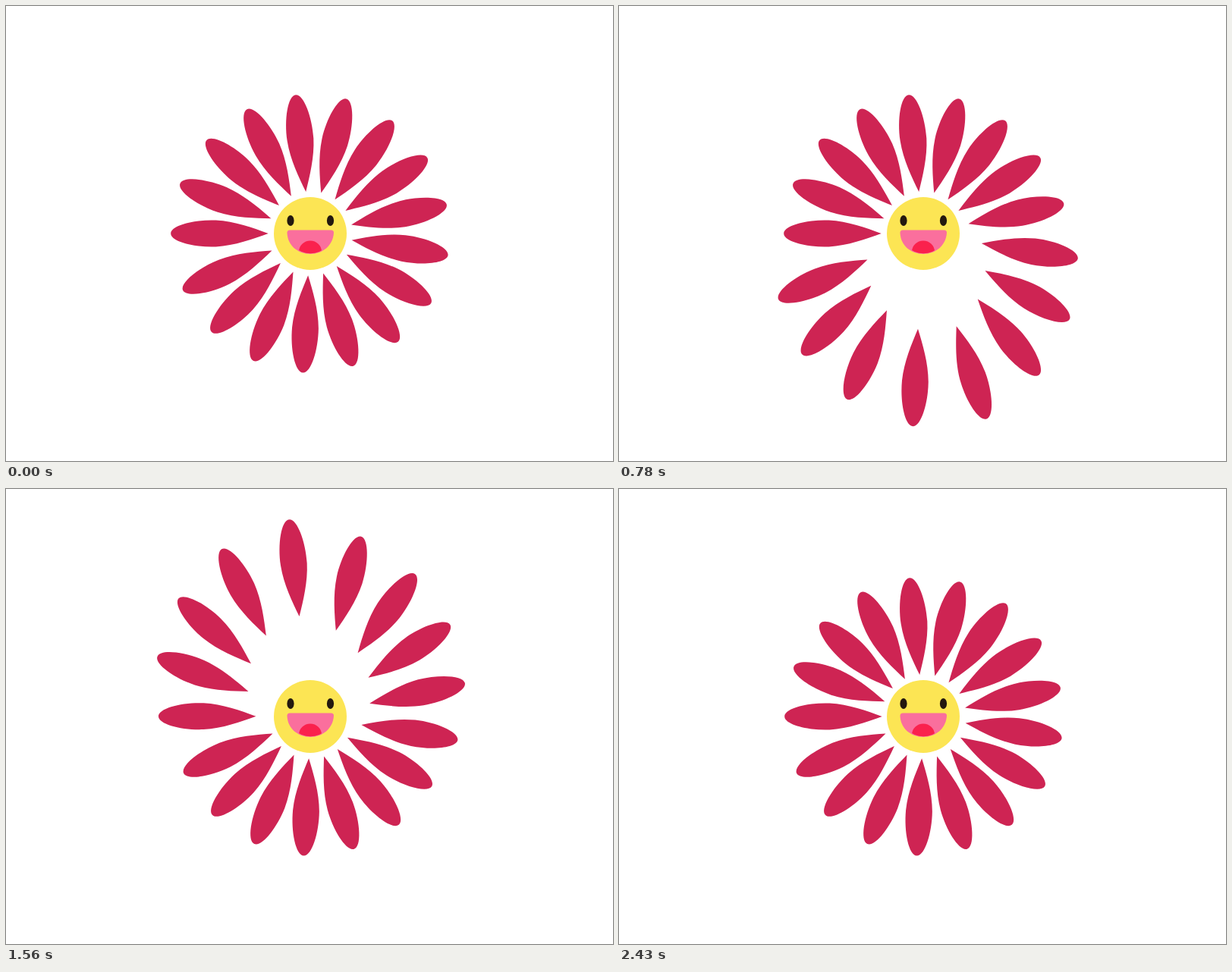
These frames come from a looping animation (800x600 px, 2460 ms). An HTML page:

```html
<!DOCTYPE html>
<html lang="en">
<head>
<meta charset="utf-8">
<title>Flower</title>
<style>
  html, body { margin: 0; width: 100%; height: 100%; overflow: hidden; background: #fff; }
  svg { display: block; width: 100%; height: 100%; }
</style>
</head>
<body>
<svg viewBox="0 0 800 600">
  <defs>
    <path id="petal" d="M0 0C20 -7.2 44 -16 69 -17.4C98 -18.6 128.5 -10.5 128.5 0C128.5 10.5 98 18.6 69 17.4C44 16 20 7.2 0 0Z"/>
    <clipPath id="lips"><path d="M371 296H431.500A30.250 30.250 0 0 1 371 296Z"/></clipPath>
  </defs>
  <g id="petals" fill="#ce2453"></g>
  <circle cx="401" cy="300" r="48" fill="#fce554"/>
  <path d="M374 295.500H428.500Q432 295.500 432 299C431 316 417 327 401 327S371 316 370.500 299Q370.500 295.500 374 295.500Z" fill="#fa6f9d"/>
  <g clip-path="url(#lips)">
    <ellipse class="pulse" data-at="401 324" rx="15" ry="14.500" fill="#fa214d"/>
  </g>
  <g fill="#23180f">
    <ellipse class="pulse" data-at="375 283" rx="4.600" ry="7"/>
    <ellipse class="pulse" data-at="427.500 283" rx="4.600" ry="7"/>
  </g>
</svg>
<script>
const LOOP = 2460, STEP = 30, COUNT = 17, RADIUS = 55.3, REACH = 80;

const rad = deg => deg * Math.PI / 180;
const progress = (t, from, to) => Math.min(1, Math.max(0, (t - from) / (to - from)));

const layer = document.getElementById('petals');
const petals = Array.from({ length: COUNT }, (_, i) => {
  const el = document.createElementNS('http://www.w3.org/2000/svg', 'use');
  el.setAttribute('href', '#petal');
  layer.append(el);
  const angle = 156 - 21 * i;
  return {
    el,
    angle,
    // the path sways a few degrees around the petal's own axis
    sway: 3 * Math.cos(2 * Math.PI * (i - 2) / 4.4),
    start: 30 + 90 * i,
    peak: 440 + 92 * i,
    // petals on the lower right fall back more slowly
    end: 965 + 92 * i + 45 * Math.cos(rad(angle - 45))
  };
});
const pulses = [...document.querySelectorAll('.pulse')];

function draw(t) {
  for (const { el, angle, sway, start, peak, end } of petals) {
    const back = progress(t, peak, end);
    const out = REACH * (progress(t, start, peak) - back);
    const path = rad(angle + sway);
    const x = 401 + back + out * Math.cos(path);
    const y = 300 + out * Math.sin(path);
    el.setAttribute('transform', `translate(${x} ${y}) rotate(${angle}) translate(${RADIUS} 0)`);
  }
  const size = 1 + 0.3 * (progress(t, 240, 480) - progress(t, 540, 750));
  for (const el of pulses) {
    el.setAttribute('transform', `translate(${el.dataset.at}) scale(${size})`);
  }
}

const begin = performance.now();
function tick() {
  const t = (performance.now() - begin) % LOOP;
  draw(Math.floor(t / STEP) * STEP);
  requestAnimationFrame(tick);
}
tick();
</script>
</body>
</html>
```
